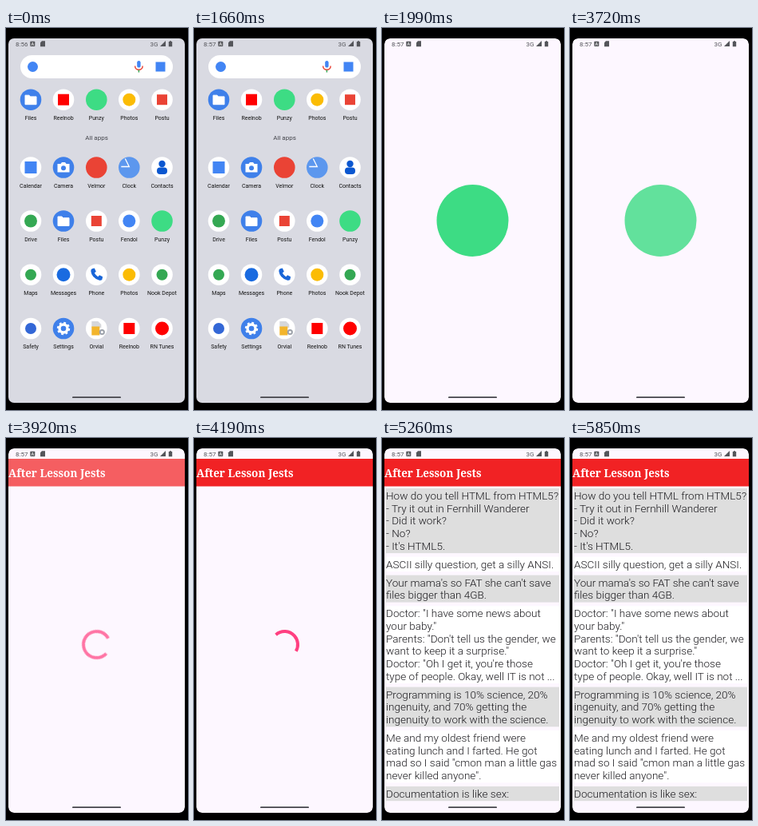
Animation of 228x478 px, one loop 6.85 s. Source, as an HTML page:

```html
<!DOCTYPE html>
<html lang="en">
<head>
<meta charset="utf-8">
<title>Joke list app</title>
<style>
html, body { margin: 0; width: 100%; height: 100%; overflow: hidden; background: #000; }
svg { display: block; width: 100vw; height: 100vh; }
text { font-family: Roboto, sans-serif; white-space: pre; }
.label { font-size: 7px; text-anchor: middle; fill: #111; }
.joke { font-size: 13.56px; font-weight: 300; fill: #1c1b1f; }
.title { font: bold 13.5px "Noto Serif", serif; fill: #fff; }
.status text { font-size: 8px; fill: #54555a; }
</style>
</head>
<body>
<svg viewBox="0 0 228 478">
  <defs>
    <clipPath id="screen"><rect x="3" y="13" width="221" height="456" rx="7"/></clipPath>
  </defs>
  <rect width="228" height="478"/>
  <g clip-path="url(#screen)">
    <g id="home">
      <rect x="3" y="13" width="221" height="456" fill="#d9dae2"/>
      <g id="homeItems">
        <rect x="18" y="34" width="191" height="29" rx="14.5" fill="#fff"/>
        <circle cx="33.5" cy="48.5" r="6.5" fill="#4285f4"/>
        <g fill="none" stroke-width="1.5">
          <rect x="164.2" y="41" width="4.4" height="8.6" rx="2.2" fill="#4285f4"/>
          <path d="M161.6 47.5a4.8 4.8 0 0 0 9.6 0" stroke="#ea4335"/>
          <path d="M166.4 52.5v3" stroke="#34a853"/>
        </g>
        <rect x="187.5" y="42.5" width="12" height="12" fill="#4285f4"/>
        <text x="113.5" y="140.3" text-anchor="middle" font-size="8" fill="#45464c">All apps</text>
      </g>
    </g>
    <rect id="win" fill="#fdf7ff"/>
    <circle id="splash" fill="#3ddc84"/>
    <g id="app">
      <rect x="3" y="26" width="221" height="34.5" fill="#f12224"/>
      <text class="title" x="3" y="49">After Lesson Jests</text>
      <circle id="spinner" cx="113.5" cy="258.5" r="16.5" pathLength="360"
              fill="none" stroke="#ff4081" stroke-width="4"/>
      <g id="list"></g>
    </g>
    <g class="status" fill="#54555a">
      <text id="clock" x="12" y="22.8"></text>
      <rect x="30.3" y="16.8" width="6" height="6.2" rx=".8"/>
      <path d="M31.8 22l1.5-4 1.5 4M32.4 20.8h1.8" fill="none" stroke="#eee" stroke-width=".7"/>
      <path d="M45 16.3h4v6.9h-6v-4.9z"/>
      <text x="180.5" y="22.8">3G</text>
      <path d="M200 16v7h-7z"/>
      <path d="M205 16.2h2v.8h1.2v6.2h-4.4V17H205z"/>
    </g>
    <rect x="83" y="461.2" width="61" height="1.9" rx=".95" fill="#44444a"/>
  </g>
</svg>
<script>
const LOOP = 6850, BLUE = '#3f80ea', ICON_R = 13.3;
const $ = id => document.getElementById(id);
const set = (id, attrs) => { for (const k in attrs) $(id).setAttribute(k, attrs[k]); };
const clamp = x => Math.max(0, Math.min(1, x));
const mix = (a, b, p) => a + (b - a) * p;

// Launcher icons, drawn around their own centre
const disc = (fill, inner = '') => `<circle r="${ICON_R}" fill="${fill}"/>${inner}`;
const dot = (fill, r = 7) => disc('#fff', `<circle r="${r}" fill="${fill}"/>`);
const box = (fill, s = 13) => disc('#fff', `<rect x="${-s / 2}" y="${-s / 2}" width="${s}" height="${s}" fill="${fill}"/>`);
const icons = {
  folder: disc(BLUE, '<path d="M-7-5.5h5l1.5 1.7H7V6H-7z" fill="#fff" stroke="#fff" stroke-linejoin="round"/>'),
  camera: disc(BLUE, `<path d="M-7.5-4.5h4l1.5-2h4l1.5 2h4V6h-15z" fill="#fff"/><circle cy=".8" r="3" fill="${BLUE}"/>`),
  clock: disc('#5c97ee', '<path d="M-10-1H0L-5-11" fill="none" stroke="#fff" stroke-width="1.3"/>'),
  person: disc('#fff', '<circle cy="-4.5" r="4.2" fill="#0b57d0"/><rect x="-6.5" y="0" width="13" height="8.5" rx="4" fill="#0b57d0"/>'),
  phone: disc('#fff', '<path d="M-5.5-7.5l3-.7 2 4.3-2 1.8q1.5 3 4.4 4.6l1.9-2 4 2-.7 3.5q-1 1.5-3.4 1Q-6 4-7-4.5-7-7-5.5-7.5z" fill="#1a66d8"/>'),
  gear: disc(BLUE, '<g fill="none" stroke="#fff"><circle r="5" stroke-width="3.4"/><circle r="7.2" stroke-width="2" stroke-dasharray="2.83"/></g>'),
  sim: disc('#fff', '<path d="M-6-9h8l4 4v4H-6z" fill="#d6d7da"/><rect x="-6" y="-2.5" width="10" height="11" fill="#f3b52c"/><circle cx="7" cy="4.5" r="2.6" fill="none" stroke="#9da2aa" stroke-width="2"/>'),
  clip: box('#f00', 14), mail: box('#ea4335'), date: box('#4285f4', 15),
  photos: dot('#fbbc04', 8), web: disc('#ea4335'), gag: disc('#3ddc84'),
  drive: dot('#34a853', 8), search: dot('#4285f4', 8), map: dot('#34a853'),
  chat: dot('#1a6be0', 8.5), store: dot('#34a853'), safety: dot('#3367d6'), tunes: dot('#f00', 8.5)
};
const columns = [31, 72, 113.3, 154.3, 195.5];
const rows = [
  [89.7, 'folder Files', 'clip Reelnob', 'gag Punzy', 'photos Photos', 'mail Postu'],
  [174.5, 'date Calendar', 'camera Camera', 'web Velmor', 'clock Clock', 'person Contacts'],
  [241.5, 'drive Drive', 'folder Files', 'mail Postu', 'search Fendol', 'gag Punzy'],
  [308.7, 'map Maps', 'chat Messages', 'phone Phone', 'photos Photos', 'store Nook Depot'],
  [376, 'safety Safety', 'gear Settings', 'sim Orvial', 'clip Reelnob', 'tunes RN Tunes']
];
for (const [y, ...apps] of rows) {
  apps.forEach((app, i) => {
    const [, icon, name] = app.match(/^(\w+) (.+)$/);
    $('homeItems').insertAdjacentHTML('beforeend',
      `<g transform="translate(${columns[i]} ${y})">${icons[icon]}<text class="label" y="25.3">${name}</text></g>`);
  });
}

const jokes = [
  'How do you tell HTML from HTML5?\n- Try it out in Fernhill Wanderer\n- Did it work?\n- No?\n- It\'s HTML5.',
  'ASCII silly question, get a silly ANSI.',
  'Your mama\'s so FAT she can\'t save\nfiles bigger than 4GB.',
  'Doctor: "I have some news about\nyour baby."\nParents: "Don\'t tell us the gender, we\nwant to keep it a surprise."\nDoctor: "Oh I get it, you\'re those\ntype of people. Okay, well IT is not ...',
  'Programming is 10% science, 20%\ningenuity, and 70% getting the\ningenuity to work with the science.',
  'Me and my oldest friend were\neating lunch and I farted. He got\nmad so I said "cmon man a little gas\nnever killed anyone".',
  'Documentation is like sex:'
];
const LINE = 15.7;
let rowY = 63;
jokes.forEach((joke, i) => {
  const lines = joke.split('\n'), h = lines.length * LINE;
  const back = `<rect x="5" y="${rowY}" width="217" height="${h + 2.6}" fill="${i % 2 ? '#fff' : '#dedede'}"/>`;
  $('list').insertAdjacentHTML('beforeend', back + lines.map((s, n) =>
    `<text class="joke" x="5" y="${rowY + 14 + n * LINE}">${s}</text>`).join(''));
  rowY += h + 7.2;
});

// Material easing: cubic-bezier(.4, 0, .2, 1)
function ease(x) {
  if (x <= 0 || x >= 1) return clamp(x);
  let lo = 0, hi = 1, u;
  for (let i = 0; i < 20; i++) {
    u = (lo + hi) / 2;
    const v = 1 - u;
    if (1.2 * u * v * v + 0.6 * u * u * v + u ** 3 < x) lo = u; else hi = u;
  }
  return u * u * (3 - 2 * u);
}

const held = (t, from, tick, last) =>
  from + tick * Math.min(last, Math.floor((t - from) / tick));

function draw(t) {
  $('clock').textContent = t < 70 ? '8:56' : '8:57';

  const p = clamp((held(t, 1660, 66, 5) - 1660) / 330), grow = 1 - (1 - p) ** 2;
  set('home', { visibility: p < 1 ? 'visible' : 'hidden' });
  set('homeItems', { opacity: 1 - p });
  set('win', {
    x: mix(100, 3, grow), y: mix(76.4, 13, grow),
    width: mix(2 * ICON_R, 221, grow), height: mix(2 * ICON_R, 456, grow),
    rx: mix(ICON_R, 7, grow), opacity: clamp(p * 2.5)
  });

  const s = held(t, 3720, 66.5, 7);
  set('splash', {
    cx: 113.5, cy: mix(89.7, 241, grow), r: mix(ICON_R, 45, grow),
    opacity: p === 0 ? 0 : t < 3720 ? 1 : clamp(1 - (s - 3690) / 150)
  });
  set('app', { opacity: clamp((s - 3790) / 180) });

  const spin = s - 3301, head = 290 * ease(spin / 666), tail = 290 * ease(spin / 666 - 1);
  set('spinner', {
    visibility: t < 4390 ? 'visible' : 'hidden',
    'stroke-dasharray': `${Math.max(0, head - tail)} 360`,
    transform: `rotate(${286 * spin / 1332 - 90 + tail} 113.5 258.5)`
  });
  set('list', { visibility: t < 4390 ? 'hidden' : 'visible' });
}

const start = performance.now();
function tick() {
  draw((performance.now() - start) % LOOP);
  requestAnimationFrame(tick);
}
draw(0);
requestAnimationFrame(tick);
</script>
</body>
</html>
```
